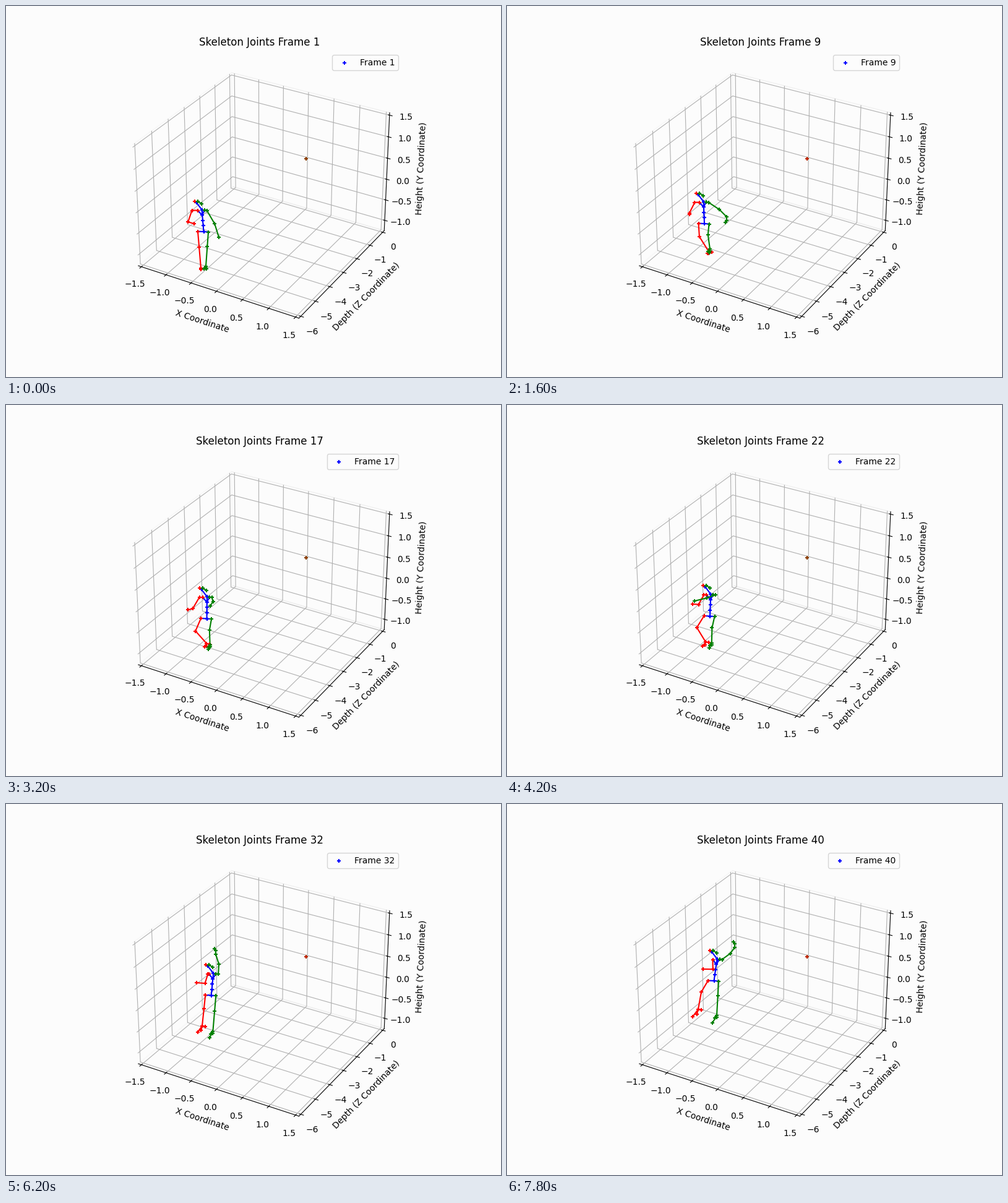
These frames come from a looping animation (800 px wide and 600 px high, 8 s). A matplotlib script:

```python
import matplotlib.pyplot as plt
import numpy as np
from matplotlib.animation import FuncAnimation

STEP, COUNT = 200, 40
BG = "#fcfcfc"
GAP = np.array([np.nan, np.nan])

# Paths of the driving joints: seconds, x, y in stage pixels
PATHS = {
    "root": [(0, 318.5, 365), (1.6, 318, 352), (4.2, 327, 341.5),
             (5.4, 327, 322.5), (7, 334.5, 296.5), (7.8, 333.5, 286)],
    "r_wrist": [(0, 304, 352), (1.6, 295, 337), (2.4, 289, 339), (4.2, 300, 322),
                (5.4, 315, 290), (7, 300, 288), (7.8, 317, 267)],
    "l_wrist": [(0, 344, 374), (1.6, 355, 341), (2.4, 352, 331), (4.2, 303, 317),
                (5.4, 329, 260), (7, 349, 226), (7.8, 368, 232)],
    "r_ankle": [(0, 315, 424), (1.6, 326, 397), (2.4, 327, 388),
                (5.4, 317, 380), (7, 317, 338), (7.8, 309, 332)],
    "l_ankle": [(0, 323, 421), (1.6, 328, 393), (5.4, 332, 381), (7.8, 339, 342)],
}


def at(name, sec):
    t, x, y = np.transpose(PATHS[name])
    return np.array([np.interp(sec, t, x), np.interp(sec, t, y)])


def knee(hip, ankle, bend):
    """Push the knee sideways as the leg gets shorter than its full length."""
    dx, dy = ankle - hip
    dist = np.hypot(dx, dy)
    slack = np.sqrt(max(0, 50**2 - dist**2))
    return hip + 0.43 * (ankle - hip) + bend * slack / dist * np.array([-dy, dx])


def chain(*pts):
    return list(zip(pts[:-1], pts[1:]))


def fan(center, *offsets):
    return [(center, center + o) for o in offsets]


def body(sec):
    """Bones by colour, and the loose hand markers, at a given time."""
    u = sec / 7.8
    root = at("root", sec)
    pelvis = root + (1, 0)
    neck = root + (8 * u - 2, -35.5)
    s3, s2, s1 = (pelvis + f * (neck - pelvis) for f in (0.75, 0.52, 0.27))
    nose = neck + (-9, -12)
    r_eye, l_eye, l_ear = nose + (-3, -2), nose + (2, -2), nose + (8, 2)

    r_clav, l_clav = neck + (-7, 1), neck + (4, 0.5)
    r_shoulder, l_shoulder = neck + (9 * u - 16, 1), neck + (8, 1)
    r_wrist, l_wrist = at("r_wrist", sec), at("l_wrist", sec)
    r_elbow = (r_shoulder + r_wrist) / 2 + (16 * u - 8, 8)
    l_elbow = (l_shoulder + l_wrist) / 2 + (3, 0)

    r_hip, l_hip = root + (-8.5, -0.5), root + (8.5, 0.5)
    r_ankle, l_ankle = at("r_ankle", sec), at("l_ankle", sec)
    r_knee, l_knee = knee(r_hip, r_ankle, 0.48), knee(l_hip, l_ankle, 0.08)

    bones = {
        "blue": chain(nose, neck, s3, s2, s1, pelvis)
        + [(s3, r_clav), (s3, l_clav), (pelvis, r_hip), (pelvis, l_hip)],
        "red": chain(r_clav, r_shoulder, r_elbow, r_wrist)
        + chain(r_hip, r_knee, r_ankle) + [(r_eye, r_eye)]
        + fan(r_ankle, (-9 * u, 1 + 11 * u), (-2 * u, 2 + 6 * u), (5, 1)),
        "green": chain(l_clav, l_shoulder, l_elbow, l_wrist)
        + chain(l_hip, l_knee, l_ankle) + [(l_eye, l_ear)]
        + fan(l_ankle, (1 - 8 * u, 4 + 8 * u), (-3, 4), (0, 3)),
    }
    hand = []
    if 1.4 < sec < 3 or sec > 6:
        side = 1 if sec < 4 else -1
        hand = [l_wrist + (0, 6 * side), l_wrist + (-2, 9 * side)]
    return bones, hand


def padded(lo, hi):
    pad = (hi - lo) / 48
    return lo - pad, hi + pad


fig = plt.figure(figsize=(8, 6), dpi=100, facecolor=BG)
ax = fig.add_subplot(projection="3d", facecolor=BG)
ax.set(xlim=padded(-1.5, 1.5), ylim=padded(-6, 0), zlim=padded(-1.2, 1.5),
       xlabel="X Coordinate", ylabel="Depth (Z Coordinate)",
       zlabel="Height (Y Coordinate)")
for axis in (ax.xaxis, ax.yaxis, ax.zaxis):
    axis.pane.fill = False
title = ax.set_title("Skeleton Joints Frame 1")

# Lost joints pile up at the origin of the 3D axes
PLUS = dict(s=20, marker="+")
ax.scatter(0, 0, 0, color="green", depthshade=False, **PLUS)
lost = ax.scatter(0, 0, 0, color="red", depthshade=False, zorder=5, **PLUS)

# Pixel-space layer for the skeleton
top = fig.add_axes([0, 0, 1, 1])
top.set(xlim=(0, 800), ylim=(600, 0))
top.axis("off")
COLORS = ("blue", "red", "green")
lines = {c: top.plot([], [], color=c, lw=1.5)[0] for c in COLORS}
dots = {c: top.scatter([], [], color=c, zorder=3, **PLUS) for c in COLORS}

legend = ax.legend([dots["blue"]], ["Frame 1"], facecolor=BG)
label = legend.get_texts()[0]


def update(i):
    bones, hand = body(i * STEP / 1000)
    for color, pairs in bones.items():
        lines[color].set_data(*np.transpose([p for a, b in pairs for p in (a, b, GAP)]))
        # Hip and clavicle ends take the colour of their own side
        own = pairs[:5] if color == "blue" else pairs
        joints = [p for pair in own for p in pair]
        if color == "green":
            joints += hand
        dots[color].set_offsets(np.unique(joints, axis=0))
    lost.set_alpha(0.75 if hand else 0.55)
    title.set_text(f"Skeleton Joints Frame {i + 1}")
    label.set_text(f"Frame {i + 1}")
    return []


anim = FuncAnimation(fig, update, frames=COUNT, interval=STEP,
                     repeat=True, repeat_delay=0)
plt.show()
```
